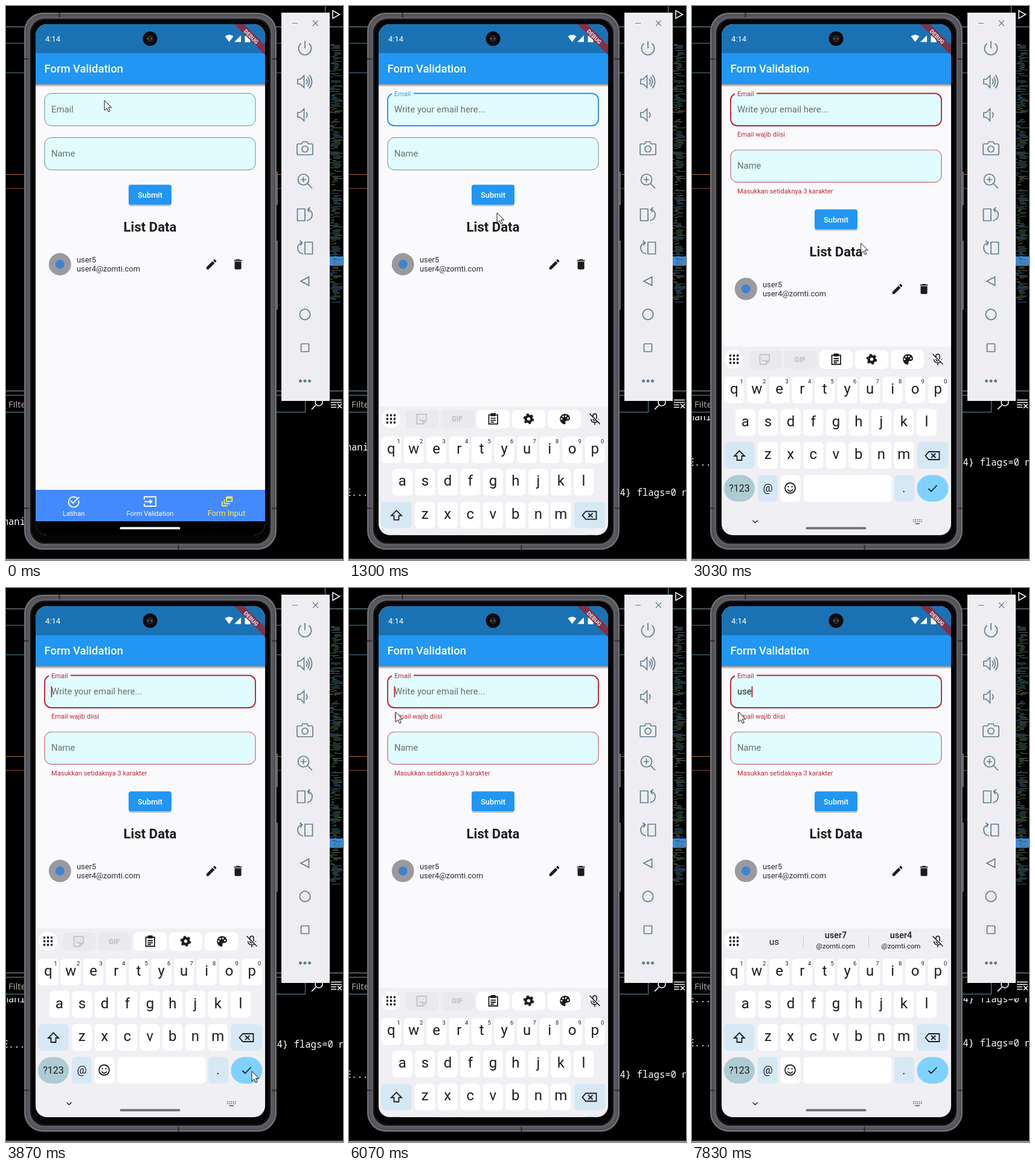
Recreate the animation shown at these times as an HTML page. Size 558x916 px, loop 8 s.

```html
<!DOCTYPE html>
<html lang="id">
<head>
<meta charset="utf-8">
<title>Form Validation</title>
<style>
html, body { margin: 0; width: 100%; height: 100%; overflow: hidden; background: #000; }
svg { display: block; font-family: Roboto, sans-serif; }
.mono { font: 15.6px "Noto Sans Mono", "Liberation Mono", monospace; fill: #fff; white-space: pre; }
.mid { text-anchor: middle; }
.body { font-size: 14.8px; fill: #66706f; }
.small { font-size: 11.08px; }
.error { font-size: 11.08px; fill: #bd2b3a; }
.line { fill: none; stroke: #607d8b; stroke-width: 1.7; }
.ink { fill: #1c1c1f; }
.pen { fill: none; stroke: #1c1c1f; stroke-width: 1.8; }

#pointer, #keyboard, #log, #log3, #label, #notch, #hint, #caret, #caretBox, #emailBox, #nameBox,
#nameRow, #lower, .error, #handle, #tools, #words, .typed { animation: 8s linear infinite; }
#pointer { animation-name: pointer; }
#keyboard { animation-name: keyboard; }
#log { animation-name: log; animation-timing-function: step-end; }
#log3 { animation-name: log3; animation-timing-function: step-end; }
#label { animation-name: label; }
#notch { animation-name: notch; }
#hint { animation-name: hint; }
#caret { animation-name: blink; animation-timing-function: step-end; }
#caretBox { animation-name: caret; animation-timing-function: step-end; }
#emailBox { animation-name: email; }
#nameBox { animation-name: name; }
#nameRow { --drop: 20.4px; animation-name: drop; }
#lower { --drop: 40.8px; animation-name: drop; }
.error { animation-name: error; }
#handle { animation-name: handle; animation-timing-function: step-end; }
#tools { animation-name: tools; animation-timing-function: step-end; }
#words, .typed { animation-name: first; animation-timing-function: step-end; }
.typed.t2 { animation-name: second; }
.typed.t3 { animation-name: third; }

@keyframes pointer {
  0%, 5% { transform: translate(163px, 156px); }
  10.375%, 10.875% { transform: translate(212px, 320px); }
  11.25%, 13.75% { transform: translate(227px, 343px); }
  16.25% { transform: translate(245px, 342px); }
  23.75%, 36.875% { transform: translate(256px, 317px); }
  43.375%, 50% { transform: translate(407px, 799px); }
  55.625%, 58.375% { transform: translate(352px, 570px); }
  62.5%, 63.5% { transform: translate(110px, 180px); }
  67.5%, 100% { transform: translate(77px, 205px); }
}
@keyframes keyboard {
  0%, 15.075%, 58.69%, 74.7% { transform: translateY(313px); animation-timing-function: cubic-bezier(0, 0, .2, 1); }
  18.64%, 56.19%, 78.26%, 100% { transform: none; animation-timing-function: cubic-bezier(.4, 0, 1, 1); }
}
@keyframes log {
  0% { transform: none; }
  5.625% { transform: translateY(-123px); }
  36.25% { transform: translateY(-173px); }
  49.375% { transform: translateY(-223px); }
  65% { transform: translateY(-346px); }
  88.75%, 100% { transform: translateY(-471px); }
}
@keyframes log3 { 0% { opacity: 0; } 88.75%, 100% { opacity: 1; } }
@keyframes label {
  0%, 4.125%, 51.25%, 63.25% { transform: translate(75px, 176px); fill: #66706f; }
  6.25%, 35% { transform: translate(75px, 148.8px) scale(.75); fill: #429fe4; }
  37.125%, 49.125%, 65.375%, 100% { transform: translate(75px, 148.8px) scale(.75); fill: #bd2b3a; }
}
@keyframes notch {
  0%, 4.125%, 51.25%, 63.25% { opacity: 0; }
  6.25%, 49.125%, 65.375%, 100% { opacity: 1; }
}
@keyframes hint {
  0%, 4.125%, 51.25%, 63.25%, 82.51%, 100% { opacity: 0; }
  6.25%, 49.125%, 65.375%, 82.5% { opacity: 1; }
}
@keyframes blink {
  0%, 10.375%, 22.875%, 35.375%, 49.125%, 69.625%, 82.125% { opacity: 0; }
  4.125%, 16.625%, 29.125%, 42.5%, 63.25%, 75.8%, 82.5%, 100% { opacity: 1; }
}
@keyframes caret {
  0% { transform: none; fill: #2196f3; }
  35% { transform: none; fill: #bd2432; }
  82.5% { transform: translateX(8px); fill: #bd2432; }
  89.375% { transform: translateX(16px); fill: #bd2432; }
  96.25%, 100% { transform: translateX(24px); fill: #bd2432; }
}
@keyframes email {
  0%, 4.125% { stroke: #72888a; stroke-width: 1px; }
  6.25%, 35% { stroke: #2a92e6; stroke-width: 1.9px; }
  37.125%, 49.125%, 65.375%, 100% { stroke: #b82432; stroke-width: 1.9px; }
  51.25%, 63.25% { stroke: #bd4450; stroke-width: 1px; }
}
@keyframes name {
  0%, 35% { stroke: #72888a; }
  37.125%, 100% { stroke: #bd4450; }
}
@keyframes drop {
  0%, 35% { transform: none; }
  37.125%, 100% { transform: translateY(var(--drop)); }
}
@keyframes error { 0%, 35% { opacity: 0; } 37.125%, 100% { opacity: 1; } }
@keyframes handle {
  0%, 58.69% { fill: #fff; opacity: 1; }
  15.075%, 74.7% { fill: #717175; opacity: 0; }
  18.125%, 77.75%, 100% { fill: #717175; opacity: 1; }
}
@keyframes tools { 0%, 66% { opacity: 1; } 56.19%, 82.5%, 100% { opacity: 0; } }
@keyframes first { 0% { opacity: 0; } 82.5%, 100% { opacity: 1; } }
@keyframes second { 0% { opacity: 0; } 89.375%, 100% { opacity: 1; } }
@keyframes third { 0% { opacity: 0; } 96.25%, 100% { opacity: 1; } }
</style>
</head>
<body>
<svg width="558" height="916" viewBox="0 0 558 916">
  <defs>
    <clipPath id="screenClip"><rect x="49" y="30" width="380" height="845" rx="19"/></clipPath>
    <clipPath id="logClip"><rect y="678" width="558" height="238"/></clipPath>
    <linearGradient id="shade" x2="0" y2="1">
      <stop stop-color="#86868a"/><stop offset="1" stop-color="#86868a" stop-opacity="0"/>
    </linearGradient>
  </defs>

  <!-- editor behind the phone -->
  <rect width="558" height="916"/>
  <g fill="none">
    <path d="M0 34.5H558M528.5 0V34" stroke="#7fa3b2"/>
    <path d="M0 61.5H456M0 110.5H456" stroke="#4a7c8c"/>
    <path d="M0 278.5H456" stroke="#a86a34"/>
    <path d="M0 301.5H456" stroke="#8c4a48"/>
    <path d="M0 636.5H558" stroke="#8fa8b4"/>
    <rect x="-5" y="643.5" width="500.5" height="28" stroke="#6690a0"/>
    <path d="M541 7.5V20.5L552.5 14Z" stroke="#fff" stroke-width="1.5"/>
    <path d="M506 667 513 660M538 651.5H556M538 655.5H556M538 659.5H547M538 663.5H547M549 658 556 665M556 658 549 665" stroke="#fff" stroke-width="1.6"/>
    <circle cx="518" cy="655" r="6" stroke="#fff" stroke-width="1.6"/>
  </g>
  <text x="4" y="664" font-family="Open Sans, sans-serif" font-size="15" fill="#b3b0a8">Filter</text>
  <g id="map"></g>
  <g clip-path="url(#logClip)"><g id="log" class="mono">
    <text x="32" y="858" text-anchor="end">mani</text>
    <text x="-5.5" y="933">E...</text><text x="448.4" y="933">4} flags=0 n</text>
    <text x="-5.5" y="1156">E...</text><text x="448.4" y="1156">4} flags=0 n</text>
    <g id="log3"><text x="-5.5" y="1229">E...</text><text x="448.4" y="1229">4} flags=0 n</text></g>
  </g></g>
  <rect y="914" width="558" height="2" fill="#7b929c"/>

  <!-- phone body -->
  <path d="M447 274h3v55h-3zM447 388h3v114h-3z" fill="#68686d"/>
  <rect x="30" y="11" width="418" height="888" rx="31" fill="#6d6d73"/>
  <rect x="33.5" y="14.5" width="411" height="881" rx="28" fill="#58585e" stroke="#3c3c41"/>
  <rect x="39" y="20" width="400" height="870" rx="25" fill="#17171a" stroke="#66666c" stroke-width="1.5"/>
  <rect x="42" y="23" width="394" height="864" rx="23" fill="#050506"/>
  <path d="M30 87.5h8M30 830.5h8M440 87.5h8M440 830.5h8M88.5 11v8M285.5 891v8" stroke="#2a2a2e" stroke-width="2"/>

  <g clip-path="url(#screenClip)">
    <rect x="49" y="30" width="380" height="845" fill="#fafafd"/>
    <rect x="49" y="129" width="380" height="5" fill="url(#shade)"/>
    <rect x="49" y="30" width="380" height="48" fill="#1a72b4"/>
    <rect x="49" y="78" width="380" height="51" fill="#2196f3"/>
    <g fill="#fff">
      <text x="65" y="59" font-size="13">4:14</text>
      <path d="M362.5 50Q369.5 45 376.5 50L369.5 59.5ZM378 59.5H389V48.5ZM395.5 49.5H398V48H402V49.5H404.5V60H395.5Z"/>
      <text x="63.5" y="110" font-size="18.46" font-weight="500">Form Validation</text>
    </g>
    <path d="M378 30H394L429 65V81Z" fill="#813048"/>
    <text class="mid" transform="translate(403.5 53) rotate(45)" font-size="9.4" font-weight="900" fill="#e2d4d8">DEBUG</text>

    <rect id="emailBox" x="64" y="144.5" width="349" height="53.5" rx="11" fill="#e0fcff"/>
    <rect id="notch" x="71" y="143" width="36" height="3" fill="#eefbfe"/>
    <text id="label" class="body">Email</text>
    <text id="hint" class="body" x="75" y="176">Write your email here...</text>
    <g font-size="14.8" fill="#212124">
      <text class="typed" x="75" y="176">u</text>
      <text class="typed t2" x="83.15" y="176">s</text>
      <text class="typed t3" x="90.8" y="176">e</text>
    </g>
    <g id="caret"><rect id="caretBox" x="74.5" y="162.5" width="1.9" height="18"/></g>
    <text class="error" x="75" y="216">Email wajib diisi</text>

    <g id="nameRow">
      <rect id="nameBox" x="64" y="217.5" width="349" height="53.5" rx="11" fill="#e0fcff"/>
      <text class="body" x="75" y="249">Name</text>
      <text class="error" x="75" y="289.6">Masukkan setidaknya 3 karakter</text>
    </g>

    <g id="lower">
      <rect x="203" y="297" width="71" height="34" rx="4" fill="#a2a2a8" opacity=".6"/>
      <rect x="203" y="295.5" width="71" height="33" rx="4" fill="#2196f3"/>
      <text class="mid" x="238.5" y="317" font-size="12.92" font-weight="500" fill="#fff">Submit</text>
      <text class="mid ink" x="238.5" y="373" font-size="22.15" font-weight="700">List Data</text>
      <circle cx="89.3" cy="427" r="18.5" fill="#9a9a9e"/>
      <circle cx="89.3" cy="427" r="7.5" fill="#3f83cf"/>
      <g font-size="12.92" fill="#2c2c30">
        <text x="117" y="424">user5</text>
        <text x="117" y="439">user4@zomti.com</text>
      </g>
      <path class="ink" transform="translate(329 416) scale(.923)" d="M3 17.25V21h3.75L17.81 9.94l-3.75-3.75ZM20.71 7.04q.7-.7 0-1.41l-2.34-2.34q-.7-.7-1.41 0l-1.83 1.83 3.75 3.75Z"/>
      <path class="ink" transform="translate(373 416) scale(.923)" d="M6 19q0 2 2 2h8q2 0 2-2V7H6ZM19 4h-3.5l-1-1h-5l-1 1H5v2h14Z"/>
    </g>

    <!-- bottom navigation -->
    <rect x="49" y="800" width="380" height="52" fill="#448aff"/>
    <rect x="49" y="852" width="380" height="23"/>
    <g fill="none" stroke="#fff" stroke-width="1.9">
      <path d="M118.5 814.5A8.5 8.5 0 1 0 120.2 817.5M107 818 111 822 121 812"/>
      <path d="M229 816V811.5H248V827H229V823M229 819.5H240"/>
    </g>
    <path d="M238 815 242.5 819.5 238 824Z" fill="#fff"/>
    <path transform="translate(355 808) scale(.923)" fill="#ffeb3b" d="M8 8H6v7q0 2 2 2h9v-2H8ZM20 3h-8q-2 0-2 2v6q0 2 2 2h8q2 0 2-2V5q0-2-2-2Zm0 8h-8V7h8ZM4 12H2v7q0 2 2 2h9v-2H4Z"/>
    <g class="mid small" fill="#fff">
      <text x="112" y="843">Latihan</text>
      <text x="238.5" y="843">Form Validation</text>
      <text x="365" y="842.5" font-size="12.92" fill="#ffeb3b">Form Input</text>
    </g>

    <g id="keyboard">
      <rect x="49" y="563" width="380" height="313" fill="#f0f0f4"/>
      <circle cx="69.5" cy="584" r="15.5" fill="#fff"/>
      <g id="dots" class="ink"></g>
      <g id="tools">
        <g id="chips"></g>
        <path d="M112.5 576.5H128V587L122.5 592.5H112.5ZM128 587H122.5V592.5M116 585Q119 589 122 585M116.5 581V582.5M123.5 581V582.5" fill="none" stroke="#c3c3c8" stroke-width="1.8"/>
        <text class="mid" x="179" y="588.5" font-size="12" font-weight="900" fill="#c3c3c8">GIF</text>
        <path class="pen" d="M231.5 577.5H246V592.5H231.5ZM234.5 583H243M234.5 586.5H243M234.5 589.5H240"/>
        <rect class="ink" x="234.5" y="574.5" width="8.5" height="5" rx="1"/>
        <circle cx="297.5" cy="584" r="4.8" class="pen" style="stroke-width:4.2"/>
        <circle cx="297.5" cy="584" r="7.6" class="pen" style="stroke-width:2.5" stroke-dasharray="4 3.96"/>
        <path class="ink" d="M357 575.5A8.8 8.8 0 0 0 357 593Q359 592.5 358.5 590Q357.5 587 360.5 587Q366 587 366 582.5Q365 575.5 357 575.5Z"/>
        <g fill="#fff"><circle cx="352" cy="584" r="1.4"/><circle cx="354.5" cy="580" r="1.4"/><circle cx="359" cy="579.5" r="1.4"/><circle cx="362.5" cy="583" r="1.4"/></g>
      </g>
      <g id="words" class="mid ink">
        <path d="M184.5 574V595M292.5 574V595" stroke="#cdcdd2"/>
        <text x="136" y="590" font-size="15.5">us</text>
        <g font-size="14.5" font-weight="500"><text x="238" y="579">user7</text><text x="346" y="579">user4</text></g>
        <g font-size="11.5"><text x="238" y="596">@zomti.com</text><text x="346" y="596">@zomti.com</text></g>
      </g>
      <path class="pen" d="M404 580V578.5A3 3 0 0 1 410 578.5V584M404 584A3 3 0 0 0 407.5 587M400.5 584Q401 590 407 590Q410 590 411.5 588.5M413.5 584V585M407 590V594M398.5 575.5 415.5 592.5" style="stroke-width:1.6"/>
      <g id="keys"></g>
      <path class="pen" d="M78.5 735.5 87 744H82.5V751H74.5V744H70ZM392 737H409.5V750H392L386.5 743.5ZM396 740 403.5 747M403.5 740 396 747M391.5 798 396 802.5 405.5 792.5"/>
      <g class="pen"><circle cx="162.5" cy="797" r="8.5"/><path d="M158 799.5Q162.5 805 167 799.5M159.5 793.5V796M165.5 793.5V796"/></g>
      <path class="pen" d="M100.5 850.5 104.5 854.5 108.5 850.5" style="stroke-width:1.3"/>
      <path d="M366 849.5H381M366 852.5H381" stroke="#555559" stroke-width="1.5" stroke-dasharray="1.6 1.6"/>
      <path d="M369.5 856H377" stroke="#555559" stroke-width="1.5"/>
    </g>
    <rect id="handle" x="188.5" y="861.5" width="100" height="3.8" rx="1.9"/>
  </g>
  <circle cx="238.5" cy="54" r="12" fill="#0a0a0c"/>
  <circle cx="238.5" cy="54" r="6" fill="#222226"/>
  <path d="M234 54h2M240 54h2" stroke="#707076" stroke-width="2"/>

  <!-- emulator controls -->
  <rect x="456" y="11" width="80" height="642" fill="#eeeef2"/>
  <g class="line">
    <path d="M474 28.5H483M508 24 517 33M517 24 508 33" stroke-width="1.2"/>
    <path d="M495 58V70M488.5 62A10.5 10.5 0 1 0 501.5 62"/>
    <path d="M483 121V129H487.5L493.5 135V115L487.5 121ZM497 120.5Q500.5 125 497 129.5"/>
    <path d="M499.5 117Q505 125 499.5 133M502.5 114Q510.5 125 502.5 136"/>
    <path d="M483 176V184H487.5L493.5 190V170L487.5 176ZM497 175.5Q500.5 180 497 184.5"/>
    <path d="M484 228H489.5L491.5 224.5H498.5L500.5 228H506Q508 228 508 230V244Q508 246 506 246H484Q482 246 482 244V230Q482 228 484 228Z"/>
    <circle cx="495" cy="236.5" r="5"/>
    <circle cx="492.5" cy="287" r="9"/>
    <path d="M499 293.5 507 301.5M488 287H497M492.5 282.5V291.5"/>
    <path id="turn" d="M482.5 335.5H495V355H482.5ZM498 355Q507 353 507 345Q507 338 500 336.5M503.5 333 499.5 336.5 502.5 341"/>
    <use href="#turn" transform="translate(990 55) scale(-1 1)"/>
    <path d="M488 455 501.5 448V462Z"/>
    <circle cx="495" cy="510" r="8.7"/>
    <rect x="488.5" y="558.5" width="13" height="13" rx="1"/>
  </g>
  <g fill="#607d8b"><circle cx="487.5" cy="620" r="2.5"/><circle cx="495" cy="620" r="2.5"/><circle cx="502.5" cy="620" r="2.5"/></g>

  <g id="pointer"><path d="M0 0V16.5L4 12.8 6.7 18.8 9.3 17.6 6.6 11.8H11.8Z" fill="#fff" stroke="#101012"/></g>
</svg>
<script>
const put = (id, html) => { document.getElementById(id).innerHTML = html; };
const box = (x, y, w, h, fill, r = 0) =>
  `<rect x="${x}" y="${y}" width="${w}" height="${h}" rx="${r}" fill="${fill}"/>`;
const text = (x, y, size, s) =>
  `<text class="mid ink" x="${x}" y="${y}" font-size="${size}">${s}</text>`;

// Letter rows and the wide keys around them
const white = '#fff', pale = '#d6e8f4', pitch = 37.5;
let keys = '';
[['qwertyuiop', 69.7, 613], ['asdfghjkl', 88.4, 666.5], ['zxcvbnm', 125.8, 721]].forEach(([row, x0, y], r) => {
  [...row].forEach((c, i) => {
    const x = x0 + i * pitch;
    keys += box(x - 16.5, y, 33, 44, white, 6) + text(x, y + 28, 24, c);
    if (r === 0) keys += text(x + 12.5, y + 11, 9.5, (i + 1) % 10);
  });
});
keys += box(53, 721, 51, 44, pale, 7) + box(372.5, 721, 52, 44, pale, 7)
  + box(53, 775.5, 51, 44, '#adcbd2', 22) + text(78.5, 802.5, 16, '?123')
  + box(109, 775.5, 33, 44, pale, 6) + text(125.5, 803, 18, '@')
  + box(146.5, 775.5, 33, 44, white, 6) + box(184.5, 775.5, 146, 44, white, 6)
  + box(335, 775.5, 33, 44, pale, 6) + text(351, 804, 20, '.')
  + box(372.5, 775.5, 52, 44, '#7fd2ff', 22);
put('keys', keys);
put('chips', [94, 152, 211, 270, 329].map((x, i) =>
  box(x, 569, 55, 31, i < 2 ? '#eaeaee' : white, 8)).join(''));

let dots = '';
for (let i = 0; i < 9; i++)
  dots += `<circle cx="${63.5 + i % 3 * 6}" cy="${578 + Math.floor(i / 3) * 6}" r="1.9"/>`;
put('dots', dots);

// Tiny code overview at the right edge
let seed = 7;
const rnd = () => (seed = seed * 16807 % 2147483647) / 2147483647;
const tints = ['#3f6a3c', '#4f6040', '#2f5a58', '#667060', '#365c84'];
let map = box(536, 414, 22, 15, '#3d86d6');
for (let y = 61; y < 490; y += 2) {
  if (rnd() < .14) continue;
  const x = 536 + Math.floor(rnd() * 9);
  map += box(x, y, 3 + Math.floor(rnd() * (555 - x)), 1, tints[Math.floor(rnd() * 5)]);
}
put('map', map);
</script>
</body>
</html>
```
